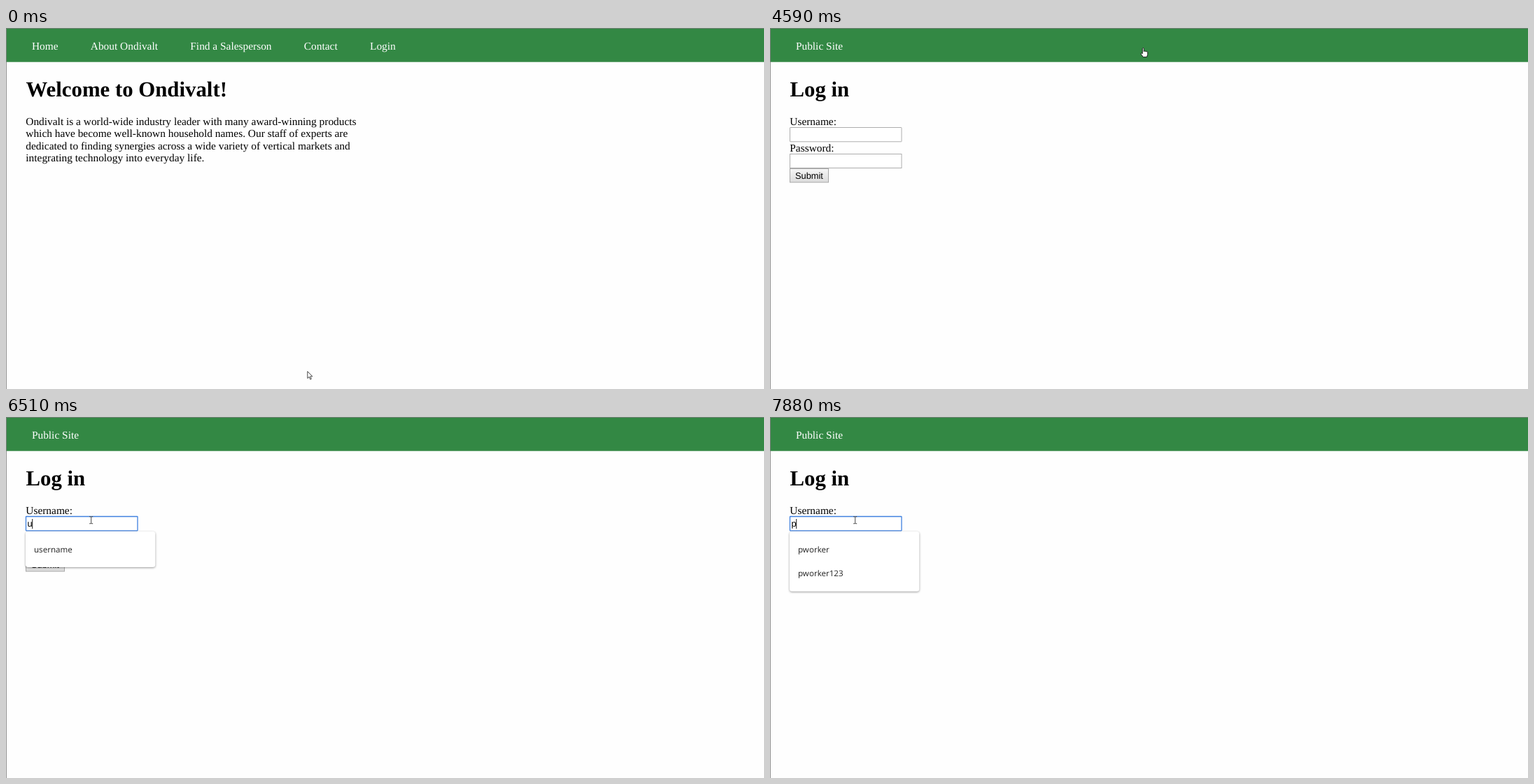
An HTML page that plays this animation: 1083x517 px, repeating every 8000 ms.

```html
<!DOCTYPE html>
<html lang="en">
<head>
<meta charset="utf-8">
<title>Login page demo</title>
<style>
  html, body { margin: 0; width: 100%; height: 100%; overflow: hidden; background: #fefefe; }
  svg { display: block; width: 1083px; height: 517px; }
  text { font: 15.4px "Liberation Serif", "Times New Roman", serif; text-rendering: geometricPrecision; }
  .nav text { fill: #fff; }
  .title { font-size: 30.8px; font-weight: bold; }
  .ui { font: 12.84px "Liberation Sans", Arial, sans-serif; }
  .field { fill: #fff; stroke: #adadad; }
  .field.focus { stroke: #3f80df; stroke-width: 1.3; }
  #menu rect { fill: #fff; filter: drop-shadow(0 1px 1.5px rgba(0, 0, 0, .4)); }
  #menu text { font: 500 11.6px "Open Sans", "Noto Sans", sans-serif; fill: #222; }
  .cursor { fill: #fff; stroke: #333; stroke-width: .9; stroke-linejoin: round; }
  #hand { stroke: #111; }
</style>
</head>
<body>
<svg viewBox="0 0 1083 517">
  <defs>
    <linearGradient id="face" x2="0" y2="1">
      <stop stop-color="#f6f6f6"/><stop offset="1" stop-color="#dcdcdc"/>
    </linearGradient>
  </defs>
  <rect width="1083" height="48.7" fill="#338844"/>
  <path d="M.5 517V.5H1083" fill="none" stroke="#808080" stroke-opacity=".85"/>

  <g id="home">
    <g class="nav">
      <text x="36.9" y="31">Home</text>
      <text x="120.8" y="31">About Ondivalt</text>
      <text x="263.3" y="31">Find a Salesperson</text>
      <text x="425.8" y="31">Contact</text>
      <text x="520" y="31">Login</text>
    </g>
    <text class="title" x="28.5" y="98">Welcome to Ondivalt!</text>
    <text x="28.3" y="139">Ondivalt is a world-wide industry leader with many award-winning products</text>
    <text x="28.3" y="156.4">which have become well-known household names. Our staff of experts are</text>
    <text x="28.3" y="173.7">dedicated to finding synergies across a wide variety of vertical markets and</text>
    <text x="28.3" y="191">integrating technology into everyday life.</text>
  </g>

  <g id="login">
    <g class="nav"><text x="36.9" y="31">Public Site</text></g>
    <text class="title" x="28.5" y="98">Log in</text>
    <text x="28.3" y="139">Username:</text>
    <rect id="user" class="field" x="28.5" y="142.5" width="159.5" height="20.3" rx=".5"/>
    <text id="typed" class="ui" x="30.4" y="157"></text>
    <rect id="caret" y="146" height="14"/>
    <text x="28.3" y="177">Password:</text>
    <rect class="field" x="28.5" y="180.5" width="159.5" height="20"/>
    <rect x="28.5" y="201.5" width="55" height="19.5" fill="url(#face)" stroke="#a8a8a8"/>
    <text class="ui" x="36" y="216">Submit</text>
    <g id="menu"></g>
  </g>

  <path id="arrow" class="cursor" d="M.5 .5V10.4L2.8 8.3L4.5 12L6 11.3L4.4 7.7H7.5Z"/>
  <path id="hand" class="cursor" d="M3 8.5V1.3a1 1 0 0 1 2 0V5.3a1 1 0 0 1 1.9 .2a1 1 0 0 1 1.8 .4a.9 .9 0 0 1 1.7 .5V9.5L9.2 13.3H4L.8 8.9a.9 .9 0 0 1 1.4 -1Z"/>
  <path id="beam" class="cursor" d="M0 .5H2L2.5 1L3 .5H5M2.5 1V10M0 10.5H2L2.5 10L3 10.5H5"/>
</svg>

<script>
const LOOP = 8000;
const names = ["pworker", "owner", "pworker123", "sevu00008", "username", "ovesk027"];
const $ = id => document.getElementById(id);
const show = (id, on) => $(id).style.display = on ? "" : "none";

// [start, shape, x, y]
const moves = [
  [0, "arrow", 430.3, 491.3], [560, "arrow", 456, 397], [700, "arrow", 512, 298],
  [830, "arrow", 554, 211], [1090, "arrow", 540, 118], [1230, "arrow", 536, 66],
  [1350, "hand", 530, 35], [1470, "hand", 529.2, 28.3], [4870, "arrow", 430, 58],
  [5000, "arrow", 245, 98], [5120, "arrow", 126, 120.5], [5260, "arrow", 123, 128],
  [5410, "beam", 120.5, 140], [5530, "beam", 119.2, 142.2]
];

// [start, typed text, prefix of listed names (null = no list), caret visible]
const inputs = [
  [0, "", null, false], [5940, "", "", true], [6390, "u", "", true],
  [6510, "u", "u", true], [7050, "", null, false], [7600, "", null, true],
  [7750, "p", null, true], [7880, "p", "p", true]
];

const current = (steps, t) => steps.findLast(s => s[0] <= t);

function drawMenu(prefix) {
  const items = prefix === null ? [] : names.filter(n => n.startsWith(prefix));
  $("menu").innerHTML = !items.length ? "" :
    `<rect x="28" y="164" width="185.3" height="${16.3 + 34.7 * items.length}" rx="3.5"/>` +
    items.map((n, i) => `<text x="40" y="${193.6 + 34.7 * i}">${n}</text>`).join("");
}

let lastInput;
function drawInput(step) {
  if (step === lastInput) return;
  lastInput = step;
  const [start, typed, prefix, caretOn] = step;
  $("user").classList.toggle("focus", start > 0);
  $("typed").textContent = typed;
  $("caret").setAttribute("x", typed ? 37.3 : 30);
  $("caret").setAttribute("width", typed ? .9 : 1.6);
  show("caret", caretOn);
  drawMenu(prefix);
}

function frame(now) {
  const t = now % LOOP;
  show("home", t < 4590);
  show("login", t >= 4590);
  drawInput(current(inputs, t));
  const [, shape, x, y] = current(moves, t);
  for (const id of ["arrow", "hand", "beam"]) show(id, id === shape);
  $(shape).setAttribute("transform", `translate(${x} ${y})`);
}

const origin = performance.now();
function tick() {
  frame(performance.now() - origin);
  requestAnimationFrame(tick);
}
tick();
</script>
</body>
</html>
```
